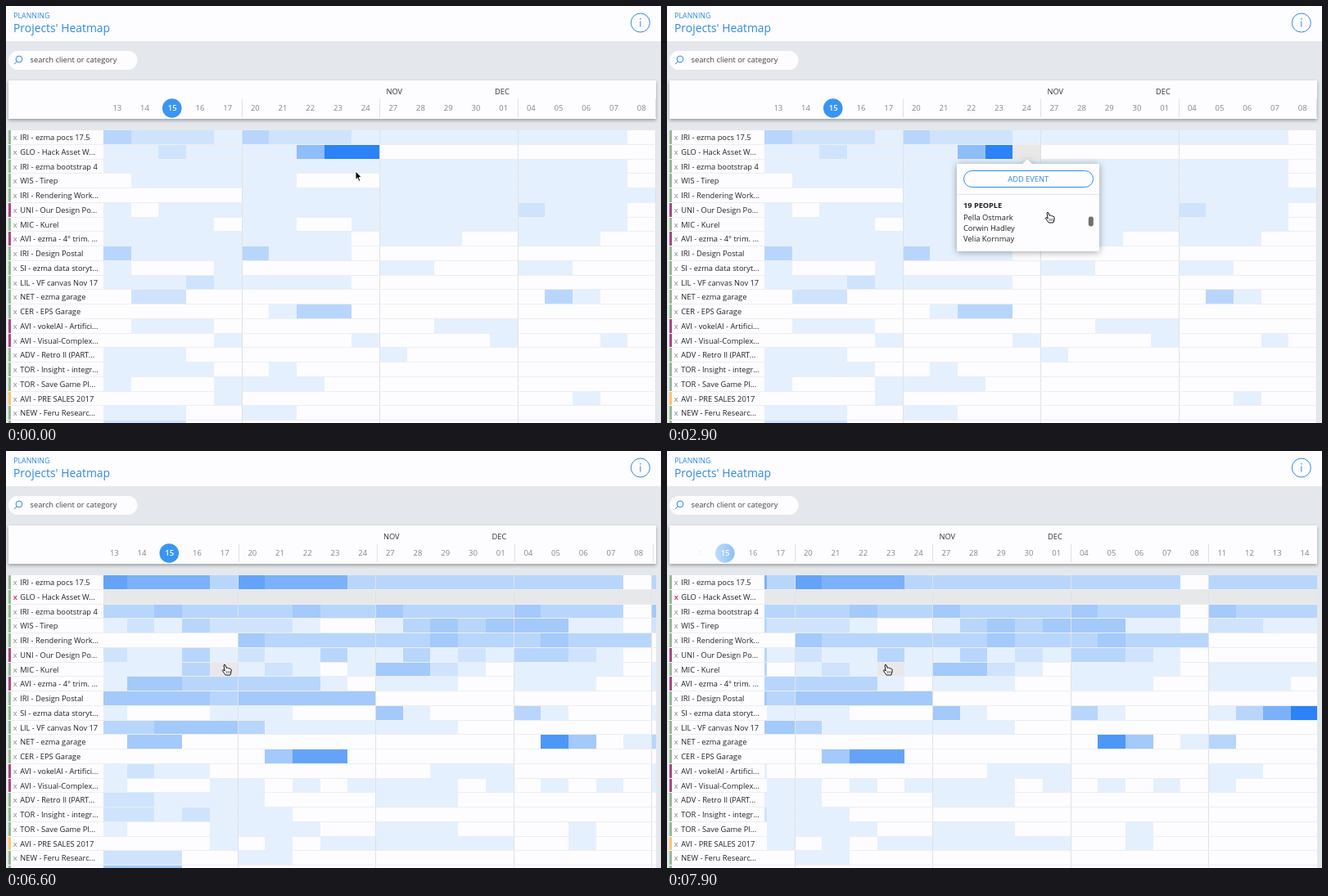
Write an HTML page with a canvas that moves like this. It is 800 by 510 pixels and loops after 8 s.

```html
<!DOCTYPE html>
<html lang="en">
<head>
<meta charset="utf-8">
<title>Projects' Heatmap</title>
<style>
  html, body { margin: 0; width: 100%; height: 100%; overflow: hidden; background: #e4e8ec; }
  canvas { display: block; width: 800px; height: 510px; }
</style>
</head>
<body>
<canvas id="stage" width="800" height="510"></canvas>
<script>
const ctx = document.getElementById('stage').getContext('2d');
const FONT = '"Open Sans", "Noto Sans", sans-serif';
const LOOP = 8000, TICK = 100;
const LEFT = 119, RIGHT = 794, TOP = 152, COL = 33.7, ROW = 17.75;
const BLUE = '#3089e3', WHITE = '#fdfcfe', HOVER = '#e8e8e9';
const GREEN = '#96bb93', PLUM = '#a8467f', AMBER = '#fac56c';

const LEVELS = {
  a: '#e5f0fe', b: '#cfe4fc', c: '#b8d6fc', d: '#a4c9fb', e: '#8fbdf9',
  f: '#7cb1f9', g: '#64a3f8', h: '#4d97f6', i: '#2b83f5'
};
const DAYS = '13 14 15 16 17 20 21 22 23 24 27 28 29 30 01 04 05 06 07 08 11 12 13 14 15'.split(' ');
const TODAY = 2, BUSY_ROW = 1, BUSY_COL = 9;

// label, category colour, load per day at first, load once the busy project is excluded
const ROWS = [
  ['IRI - ezma pocs 17.5', GREEN, 'cbbba cbbba aaaaa aaaa.', 'gfffc gfffc ccccc cccc. cccc'],
  ['GLO - Hack Asset W...', GREEN, 'aabaa aaeii', ''],
  ['IRI - ezma bootstrap 4', GREEN, 'aaaaa aaaaa aaaaa aaaa.', 'ccdcc ccdcc dcccc dccc. dccc'],
  ['WIS - Tirep', GREEN, '.aaaa aa... aaaaa aaaa.', 'abacb bba.. acdcd ddaa. bbaa'],
  ['IRI - Rendering Work...', GREEN, '..... aaaaa aaaaa aaaaa', '..... dcccc ccdcc cdccc'],
  ['UNI - Our Design Po...', PLUM, 'a.aaa aaaaa aaaaa baaa.', 'baaca baaca acaba ccba.'],
  ['MIC - Kurel', GREEN, 'aaaa. aa..a aaaaa aaaa.', 'aaac. aba.a ddba. aaaa. aaaa'],
  ['AVI - ezma - 4° trim. ...', PLUM, 'aaaaa aaaa. aaa.. aaa..', 'addcc ccca. aaa.. aaa.. aaa.'],
  ['IRI - Design Postal', GREEN, 'caaaa caaa.', 'ddddc ddddd'],
  ['SI - ezma data storyt...', GREEN, 'a...a ..... aa... aa...', 'a...a aa... da... ca... acfi'],
  ['LIL - VF canvas Nov 17', GREEN, 'aaaba aaaa.', 'ccddd caaaa aaa..'],
  ['NET - ezma garage', GREEN, '.bb.. ..... ..... .ca..', '.dd.. ..... ..... .hd.a c...'],
  ['CER - EPS Garage', GREEN, '..... .acc.', '..... .dgg.'],
  ['AVI - vokelAI - Artifici...', PLUM, '.aaa. ..... ..aaa', 'abaa. ..... ..aaa ..... aa..'],
  ['AVI - Visual-Complex...', PLUM, '....a ....a ....a ...a.', 'a...a a.a.a aaa.a .a.a. a...'],
  ['ADV - Retro II (PART...', GREEN, 'aaa.. ..... a....', 'bbaaa a.... aaa..'],
  ['TOR - Insight - integr...', GREEN, 'aaaa. .a...', 'bbaba aa...'],
  ['TOR - Save Game Pl...', GREEN, 'a...a aaa..', 'a...a aaa.. aaa.. ..a..'],
  ['AVI - PRE SALES 2017', AMBER, '....a ..... ..... ..a..', '....a .a.aa aaaaa ..a..'],
  ['NEW - Feru Researc...', GREEN, 'aaa.. aa...', 'bbb.. aa...'],
  ['', GREEN, 'bbb..', 'ddd..']
].map(([label, bar, before, after]) => ({
  label, bar, before: before.replace(/ /g, ''), after: after.replace(/ /g, '')
}));

const PEOPLE = ['Tavo Rembley', 'Miron Delfasker', 'Jorina Waldrup', 'Pella Ostmark', 'Corwin Hadley',
  'Velia Kornmay', 'Marisa Quenfield', 'Ottavia Brul', 'Bernadin Galf'];

// time, x, y
const POINTER = [[0, 427, 202], [500, 427, 202], [900, 437, 190], [1000, 438, 181], [1500, 438, 181],
  [1900, 465, 252], [3600, 465, 252], [3800, 440, 248], [4000, 310, 236], [4100, 245, 232],
  [4200, 205, 231], [4500, 62, 199], [4800, 20, 183], [5000, 12, 179], [5700, 12, 179],
  [6000, 70, 205], [6300, 230, 254], [6500, 267, 261]];
const DAY_SCROLL = [[6500, 0], [6600, 5], [6700, 20], [6800, 46], [6900, 78], [7000, 107],
  [7100, 121], [7200, 128], [7300, 131], [7400, 132]];
const LIST_SCROLL = [[2200, 0], [2600, 18], [3100, 50], [3500, 67]];

const POPUP_FROM = 1400, SWITCH = 5500, SCROLL_END = 7400;

function track(points, t, k = 1) {
  if (t <= points[0][0]) return points[0][k];
  for (let n = 1; n < points.length; n++) {
    const a = points[n - 1], b = points[n];
    if (t <= b[0]) return a[k] + (b[k] - a[k]) * (t - a[0]) / (b[0] - a[0]);
  }
  return points[points.length - 1][k];
}

const pointerAt = t => ({ x: track(POINTER, t, 1), y: track(POINTER, t, 2) });
const rowTop = r => Math.round(TOP + ROW * r);

function box(x, y, w, h, color) {
  ctx.fillStyle = color;
  ctx.fillRect(x, y, w, h);
}

function pill(x, y, w, h, r) {
  ctx.beginPath();
  ctx.roundRect(x, y, w, h, r);
}

function text(str, x, y, color, size = 9.3, weight = 400, align = 'left') {
  ctx.font = `${weight} ${size}px ${FONT}`;
  ctx.textAlign = align;
  ctx.fillStyle = color;
  ctx.fillText(str, x, y);
}

function clipped(x, y, w, h, draw) {
  ctx.save();
  ctx.beginPath();
  ctx.rect(x, y, w, h);
  ctx.clip();
  draw();
  ctx.restore();
}

function shadow(color, blur, dy) {
  ctx.shadowColor = color;
  ctx.shadowBlur = blur;
  ctx.shadowOffsetY = dy;
}

function drawTop() {
  box(0, 0, 800, 43, WHITE);
  text('PLANNING', 9.2, 14.8, BLUE, 8.8);
  text("Projects' Heatmap", 9, 32.2, BLUE, 13.9);
  ctx.strokeStyle = BLUE;
  ctx.lineWidth = 1;
  ctx.beginPath();
  ctx.arc(774.8, 20.5, 11.5, 0, 7);
  ctx.stroke();
  box(774.3, 18.5, 1, 7, BLUE);
  box(774.2, 15, 1.3, 1.4, BLUE);

  pill(3, 55, 157.5, 23, 11.5);
  ctx.fillStyle = WHITE;
  ctx.fill();
  ctx.beginPath();
  ctx.arc(16, 65, 3.9, 0, 7);
  ctx.moveTo(13.2, 67.8);
  ctx.lineTo(10, 71.2);
  ctx.stroke();
  text('search client or category', 29.5, 69.4, '#444');
}

function drawHeader(scroll) {
  ctx.save();
  shadow('rgba(0,0,0,.32)', 4, 2);
  box(3, 91, RIGHT - 3, 47, WHITE);
  ctx.restore();
  clipped(3, 91, RIGHT - 3, 47, () => {
    DAYS.forEach((day, c) => {
      const x = LEFT + c * COL - scroll, mid = x + COL / 2;
      if (c && c % 5 === 0) box(Math.round(x), 114, 1, 22, '#dfe1e4');
      if (c === TODAY) {
        ctx.fillStyle = '#3a95f2';
        ctx.beginPath();
        ctx.arc(mid - .5, 125, 11.8, 0, 7);
        ctx.fill();
      }
      const today = c === TODAY;
      text(day, mid, 128.4, today ? '#fff' : '#858585', 9.5, today ? 600 : 400, 'center');
    });
    text('NOV', 464.4 - scroll, 107.9, '#333');
    text('DEC', 597 - scroll, 107.9, '#333');
    const fade = ctx.createLinearGradient(32, 0, LEFT, 0);
    fade.addColorStop(0, 'rgba(253,252,254,1)');
    fade.addColorStop(1, 'rgba(253,252,254,0)');
    box(3, 92, LEFT - 3, 45, fade);
  });
}

function drawRows(scroll, excluded, hovered) {
  box(3, TOP, RIGHT - 3, 510 - TOP, WHITE);
  const edge = c => Math.round(LEFT + c * COL - scroll);
  clipped(LEFT, TOP, RIGHT - LEFT, 510 - TOP, () => {
    ROWS.forEach((row, r) => {
      const y = rowTop(r), h = rowTop(r + 1) - y;
      [...(excluded ? row.after : row.before)].forEach((level, c) => {
        if (LEVELS[level]) box(edge(c), y, edge(c + 1) - edge(c), h, LEVELS[level]);
      });
      if (excluded && r === BUSY_ROW) box(LEFT, y, RIGHT - LEFT, h, '#e7e8ea');
      for (const [hr, hc] of hovered)
        if (hr === r) box(edge(hc), y, edge(hc + 1) - edge(hc), h, HOVER);
    });
    for (let c = 5; c < 25; c += 5) box(edge(c), TOP, 1, 358, '#dee2e7');
  });
  ROWS.forEach((row, r) => {
    const y = rowTop(r), off = excluded && r === BUSY_ROW;
    box(6, rowTop(r + 1) - 1, RIGHT - 6, 1, '#ebeef2');
    box(3, y, 3, rowTop(r + 1) - y - 1, row.bar);
    if (!row.label) return;
    text('x', 8.8, y + 11.7, off ? '#d3245f' : '#858585', 9.3, off ? 600 : 400);
    text(row.label, 17.2, y + 11.7, '#222');
  });
}

function drawPopup(scroll) {
  ctx.save();
  shadow('rgba(0,0,0,.36)', 9, 1);
  ctx.fillStyle = WHITE;
  ctx.beginPath();
  ctx.moveTo(354, 193);
  ctx.lineTo(434, 193);
  ctx.lineTo(440, 187.5);
  ctx.lineTo(446, 193);
  ctx.lineTo(528, 193);
  ctx.lineTo(528, 300);
  ctx.lineTo(354, 300);
  ctx.fill();
  ctx.restore();

  pill(362.5, 201.5, 158, 20, 10);
  ctx.strokeStyle = BLUE;
  ctx.lineWidth = 1;
  ctx.stroke();
  text('ADD EVENT', 441.2, 214.8, BLUE, 9.3, 400, 'center');
  box(354, 230, 174, 1, '#e4e5e7');
  text('19 PEOPLE', 362, 247.3, '#222', 9.2, 700);
  clipped(360, 251, 150, 41, () => PEOPLE.forEach((name, n) =>
    text(name, 362, 260.5 + n * 13 - scroll, '#222')));
  pill(514.8, 252 + scroll * .15, 6, 12, 3);
  ctx.fillStyle = '#707070';
  ctx.fill();
}

function outline(points, fill, stroke) {
  ctx.beginPath();
  points.forEach(([x, y]) => ctx.lineTo(x, y));
  ctx.closePath();
  ctx.lineJoin = 'round';
  ctx.fillStyle = fill;
  ctx.strokeStyle = stroke;
  ctx.lineWidth = 1;
  ctx.fill();
  ctx.stroke();
}

function drawPointer({ x, y }, hand) {
  ctx.save();
  ctx.translate(x, y);
  if (hand) {
    outline([[-1, 1], [0, .3], [1, 1], [2, 4.3], [3.4, 4], [4.4, 4.7], [5.8, 4.6], [6.4, 5.5],
      [7.6, 5.6], [8.2, 6.8], [7.8, 10], [6.8, 13], [1.2, 13], [-.8, 10.3], [-2.7, 7.6],
      [-2, 6.5], [.2, 8]], '#fff', '#111');
    ctx.beginPath();
    for (const k of [2.2, 4.1, 6]) {
      ctx.moveTo(k, 8);
      ctx.lineTo(k, 11);
    }
    ctx.lineWidth = .6;
    ctx.stroke();
  } else {
    outline([[0, 0], [0, 10.5], [2.4, 8.3], [4, 12.4], [5.8, 11.6], [4.2, 7.7], [7.2, 7.5]], '#000', '#fff');
  }
  ctx.restore();
}

function hoveredCells(t, popup) {
  const cells = [];
  if (popup || (t >= 1000 && t < POPUP_FROM)) cells.push([BUSY_ROW, BUSY_COL]);
  const { x, y } = pointerAt(t - TICK);
  const overPopup = popup && x > 354 && x < 528 && y > 187 && y < 300;
  if (t > 3600 && !overPopup && x > LEFT) {
    const offset = t >= SCROLL_END ? track(DAY_SCROLL, t) : 0;
    cells.push([Math.floor((y - TOP) / ROW), Math.floor((x + offset - LEFT) / COL)]);
  }
  return cells;
}

function draw(t) {
  const popup = t >= POPUP_FROM && t < SWITCH;
  box(0, 0, 800, 510, '#e4e8ec');
  drawTop();
  drawRows(track(DAY_SCROLL, t), t >= SWITCH, hoveredCells(t, popup));
  drawHeader(track(DAY_SCROLL, t - 30));
  if (popup) drawPopup(track(LIST_SCROLL, t));
  drawPointer(pointerAt(t), t >= 1000);
}

function frame(now) {
  const t = now % LOOP;
  draw(Math.floor(t / TICK) * TICK);
  requestAnimationFrame(frame);
}
requestAnimationFrame(frame);
</script>
</body>
</html>
```
